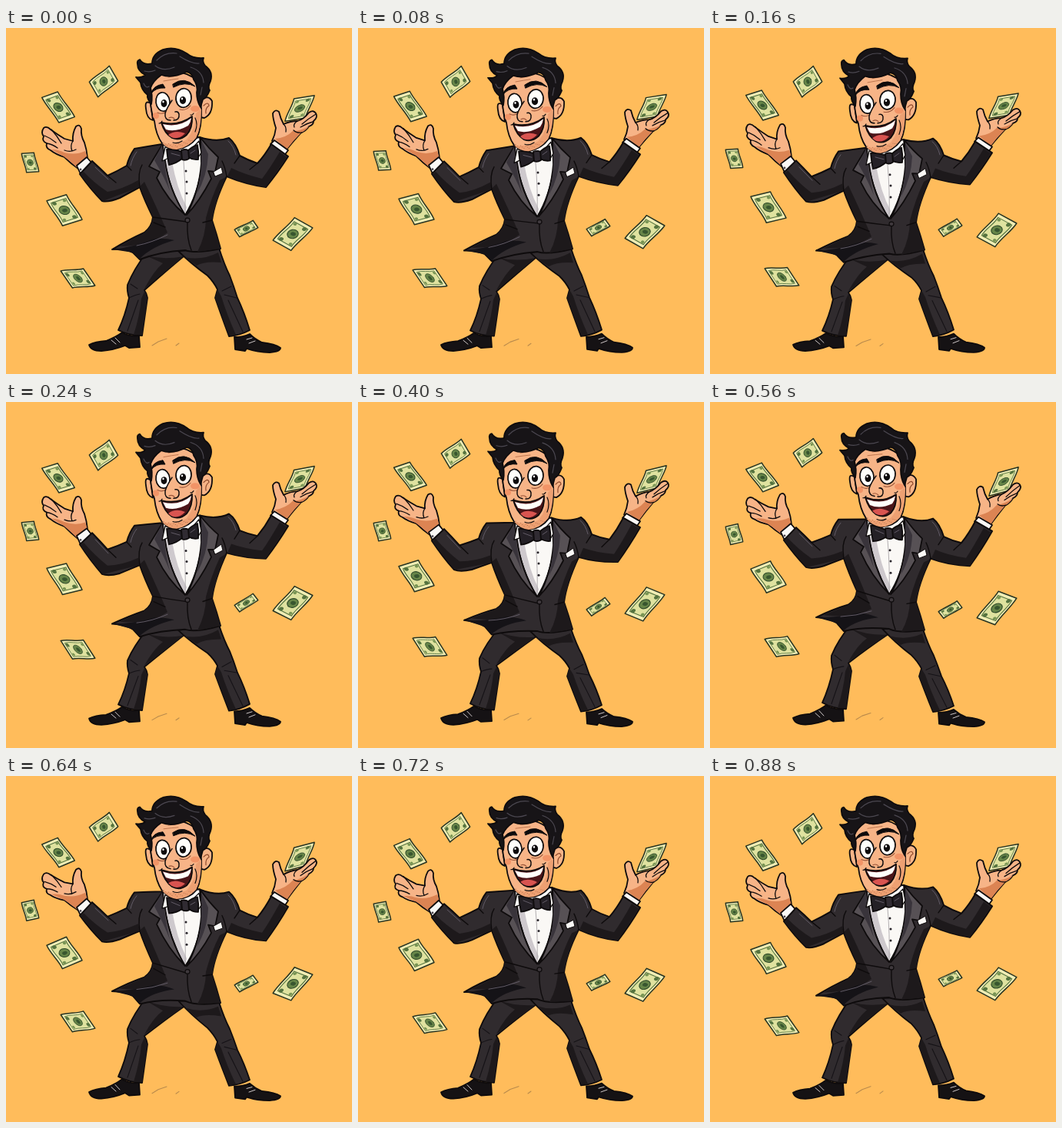
Animation of 450x450 px, one loop 960 ms. Source, as an HTML page with a canvas:

```html
<!DOCTYPE html>
<html lang="en">
<head>
<meta charset="utf-8">
<title>Money juggler</title>
<style>
html, body { margin: 0; width: 100%; height: 100%; overflow: hidden; background: #ffbc5b; }
canvas { display: block; width: 450px; height: 450px; }
</style>
</head>
<body>
<canvas id="stage" width="450" height="450"></canvas>
<script>
const ctx = document.getElementById('stage').getContext('2d');
const LOOP = 960, STEP = 80;
const TOP = 25, BOTTOM = 425, SWELL = 5.6, DELAY = 2.68, LEAD = 239;
const INK = '#0e0b0c', SUIT = '#302b2e', DARK = '#1d191b', LAPEL = '#575155';
const SKIN = '#f7b487', SHADE = '#dc8453', WHITE = '#faf8f5';
let time = 0;

// A vertical ripple runs from left to right, strongest at mid-height.
// Shapes are drawn in their pose at time 0, so the ripple is measured from there.
function sway(x, y) {
  const height = Math.max(0, Math.sin(Math.PI * (y - TOP) / (BOTTOM - TOP)));
  const ripple = t => Math.cos(2 * Math.PI * (t - DELAY * x + LEAD) / LOOP);
  return y + SWELL * height * (ripple(time) - ripple(0));
}

function shape(d, fill, stroke = INK, width = 1.8) {
  const path = new Path2D(d.replace(/([\d.]+),([\d.]+)/g, (_, x, y) => `${x},${sway(+x, +y)}`));
  if (fill) { ctx.fillStyle = fill; ctx.fill(path); }
  if (stroke) { ctx.strokeStyle = stroke; ctx.lineWidth = width; ctx.stroke(path); }
}
const line = (d, color = INK, width = 1.3) => shape(d, null, color, width);

function oval(x, y, rx, ry, fill, stroke, width = 1.6, tilt = 0) {
  ctx.beginPath();
  ctx.ellipse(x, sway(x, y), rx, ry, tilt, 0, 7);
  ctx.fillStyle = fill;
  ctx.fill();
  if (stroke) { ctx.strokeStyle = stroke; ctx.lineWidth = width; ctx.stroke(); }
}

// A note spanned by two half-side vectors around its centre.
function bill({ at: [x, y], u: [ux, uy], v: [vx, vy] }) {
  const k = Math.hypot(ux, uy) / 20;
  const tilt = (dx, dy) => (sway(x + dx, y + dy) - sway(x - dx, y - dy)) / 2;
  const trace = (draw, fill, stroke, width) => {
    ctx.save();
    ctx.transform(ux, tilt(ux, uy), vx, tilt(vx, vy), x, sway(x, y));
    ctx.beginPath();
    draw();
    ctx.restore();
    if (fill) { ctx.fillStyle = fill; ctx.fill(); }
    if (stroke) { ctx.strokeStyle = stroke; ctx.lineWidth = width; ctx.stroke(); }
  };
  const sheet = s => () => {
    ctx.moveTo(-s, -s);
    ctx.bezierCurveTo(-s / 3, -s - .16, s / 3, -s + .16, s, -s);
    ctx.lineTo(s, s);
    ctx.bezierCurveTo(s / 3, s + .16, -s / 3, s - .16, -s, s);
    ctx.closePath();
  };
  trace(sheet(1), '#f0edb4', '#263321', 1.5);
  trace(sheet(.76), '#dfe29f', '#55733f', .9 * k + .2);
  for (const sx of [-1, 1]) {
    trace(() => ctx.ellipse(sx * .66, sx * .5, .14, .2, 0, 0, 7), '#55733f');
    trace(() => ctx.ellipse(sx * .64, -sx * .52, .1, .16, 0, 0, 7), '#789453');
  }
  trace(() => ctx.ellipse(0, 0, .32, .48, 0, 0, 7), '#668548', '#314c2b', 1.1 * k);
  trace(() => ctx.ellipse(.02, .02, .13, .24, 0, 0, 7), '#38562f');
}

const bills = [
  { at: [127, 69.5], u: [13, -10.5], v: [5.7, 9.8] },
  { at: [68, 103], u: [11, 16.3], v: [10.3, -3.7] },
  { at: [31.5, 175], u: [3.2, 12.3], v: [8, -.5] },
  { at: [76, 237], u: [10.2, 16.3], v: [12.8, -4] },
  { at: [93.5, 325.5], u: [14.7, -1.5], v: [7.6, 11] },
  { at: [312.5, 261], u: [12, -6], v: [3.3, 4.7] },
  { at: [373, 268], u: [14, -14.8], v: [11.8, 6.6] }
];
const heldBill = { at: [382, 104.5], u: [5.8, -14.6], v: [13.3, -2.2] };

function legs() {
  shape('M184,290 Q166,314 158,334 Q157,342 160,351 Q155,374 146,393 Q160,400 177,400 Q181,372 184,351 Q183,345 180,341 Q207,317 231,297 L240,288 Z', SUIT);
  shape('M224,290 Q240,306 262,322 Q270,330 275,340 L272,351 Q280,374 290,401 Q304,400 317,393 Q310,370 301,351 Q296,335 291,322 Q284,308 277,286 Z', SUIT);
  shape('M182,296 Q205,302 231,297 Q207,317 180,339 Q192,316 204,306 Z', DARK, null);
  shape('M180,343 L184,351 L177,399 L166,399 Q174,374 176,352 Z', DARK, null);
  shape('M232,298 Q255,303 276,292 L280,305 Q258,303 248,309 Z', DARK, null);
  shape('M275,340 L272,351 L290,400 L299,399 Q287,372 280,349 Z', DARK, null);
  line('M160,351 Q168,347 174,346 M162,333 L171,339 M172,354 L158,394 M293,336 L281,342 M300,351 L284,347 M289,354 L308,395', '#151216', 1.1);
  shape('M108,412 Q116,408 130,407 Q143,402 151,396 Q161,402 173,400 L174,415 L160,416 L155,413 Q140,419 124,420 Q110,420 108,412 Z', '#151214');
  shape('M297,402 Q308,402 317,398 Q324,405 333,409 Q350,411 357,416 Q357,421 343,422 Q327,422 313,417 L311,420 L298,418 Z', '#151214');
  line('M137,406 L143,411 M142,403 L148,409', '#cfc8c8', 1);
  line('M313,405 L320,403 M316,410 L324,407', '#cfc8c8', 1);
  line('M190,413 L198,408 M198,408 L209,404 M221,413 L225,410', '#b98a4c', 1.1);
}

function leftHand() {
  shape('M94,183 Q84,176 76,168 Q64,164 58,159 Q51,156 53,150 Q46,147 49,141 Q45,136 49,130 Q53,127 58,132 Q66,138 76,144 L87,147 Q86,137 91,128 Q96,124 98,131 Q97,140 102,149 Q105,158 106,169 Z', SKIN);
  shape('M59,158 Q68,158 76,162 Q90,166 103,160 L106,169 L94,183 Q82,172 75,167 Z', SHADE, null);
  line('M50,140 Q58,143 65,149 M53,150 Q60,151 67,156 M59,132 Q67,141 72,150 M87,147 Q83,153 86,160 M76,159 Q84,162 91,158');
}

function rightHand() {
  shape('M346,147 Q350,139 351,130 Q347,118 347,111 Q350,105 355,109 Q357,118 361,125 Q370,121 379,121 Q387,119 394,110 Q400,106 403,111 Q406,116 400,121 Q400,126 394,128 Q390,134 384,136 Q374,147 365,158 Z', SKIN);
  shape('M350,144 Q364,143 373,134 Q383,134 394,128 Q389,134 384,136 Q373,147 365,158 Z', SHADE, null);
  line('M403,112 Q393,118 385,125 M399,122 Q391,124 383,129 M361,125 Q365,129 364,135 M379,121 Q373,125 375,129 M385,136 Q378,137 374,133');
}

function jacket() {
  shape('M92,179 L105,168 L112,176 L97,190 Z', WHITE);
  shape('M344,151 L349,146 L367,159 L361,167 Z', WHITE);
  oval(97, 184, 1.4, 1.4, '#4a454c');
  shape('M203,151 Q184,154 167,157 Q160,167 157,179 Q145,186 132,192 Q123,183 112,173 L96,190 Q110,210 125,225 Q133,227 148,221 L174,207 Q180,224 191,246 Q190,258 180,266 Q160,275 138,288 Q155,287 165,292 L174,301 Q200,291 233,289 Q247,294 279,287 Q274,268 268,250 Q271,226 287,193 Q311,203 338,207 Q353,189 367,167 L345,151 Q337,165 327,176 Q315,172 304,166 Q299,150 290,143 Q274,149 252,142 Z', SUIT, INK, 2);
  shape('M97,191 Q112,211 126,225 L174,207 L172,198 Q151,210 132,213 Q115,202 101,187 Z', DARK, null);
  shape('M288,193 Q312,203 338,207 L365,168 L356,161 Q343,183 333,196 Q309,190 293,182 Z', DARK, null);
  shape('M174,206 L191,246 Q190,259 179,267 L148,284 Q188,283 210,266 Q197,235 180,200 Z', DARK, null);
  shape('M279,287 L268,250 Q272,225 286,194 L278,198 Q267,220 260,247 Q260,270 249,291 Z', DARK, null);
  shape('M139,288 Q166,285 193,274 Q207,273 219,276 Q190,284 174,300 L165,292 Z', '#151317', null);
  line('M174,207 Q171,188 177,178 M132,192 L143,201 M157,179 L163,185 M287,193 Q285,181 281,173 M304,166 L297,176 M327,176 L317,184 M192,253 L207,259 M191,246 Q213,249 235,252 M236,253 Q235,274 241,289 M268,250 L256,253', INK, 1.4);
  line('M170,161 Q164,169 162,179 M289,147 Q296,153 299,165 M116,181 L133,197 M210,269 Q190,279 170,283', '#625b66', 1);
}

function shirt() {
  shape('M204,151 Q207,197 233,243 Q249,218 255,179 L252,142 Z', WHITE);
  shape('M207,171 Q213,209 233,242 L235,233 Q222,208 216,174 Z', '#cec9cd', null);
  line('M231,173 Q234,207 233,239', '#aaa5a9', .9);
  for (const [x, y] of [[234, 186], [235, 200], [235, 215]]) oval(x, y, 1.5, 1.5, '#272329');
  shape('M203,152 L186,180 L200,187 L196,195 Q210,224 233,243 Q212,211 207,173 Z', LAPEL);
  shape('M253,143 Q264,157 276,168 L272,187 L263,186 L267,196 Q252,225 235,243 Q251,213 254,176 Z', LAPEL);
  shape('M203,152 L193,172 Q207,196 213,212 Q207,189 206,173 Z', '#39343b', null);
  shape('M254,146 L263,164 Q262,192 248,216 Q254,195 254,174 Z', '#39343b', null);
  shape('M270,187 L280,181 L282,189 L272,193 Z', WHITE, INK, 1);
  shape('M207,155 L203,173 L214,168 L229,163 Z M251,147 L254,162 L249,170 L236,163 Z', WHITE, INK, 1.3);
  shape('M229,161 Q218,157 209,158 Q210,169 212,178 Q222,176 230,169 Z', '#242026');
  shape('M236,160 Q242,154 249,152 Q251,161 250,171 Q243,172 237,168 Z', '#242026');
  shape('M228,159 Q233,157 237,159 L238,170 Q233,173 229,171 Z', '#302b32');
  line('M215,163 L226,166 M240,163 L246,159', '#625b66', 1);
  oval(236, 250, 3, 2.8, '#3f393d', INK, 1.2);
}

function face() {
  shape('M188,98 Q180,93 182,105 Q183,118 191,120 Z', SKIN);
  shape('M253,94 Q263,86 268,95 Q269,112 258,117 L252,116 Z', SKIN);
  line('M257,101 Q263,95 264,101 Q259,104 260,111', '#8f4b2d', 1.2);
  shape('M187,76 Q187,106 193,121 Q195,139 203,150 Q213,159 223,158 Q239,155 248,143 Q255,129 254,105 L251,70 Q228,49 195,62 Z', SKIN);
  shape('M254,105 Q254,130 247,143 Q236,156 222,158 Q211,158 203,150 Q222,153 235,145 Q247,131 247,111 Z', '#eda072', null);
  oval(246, 105, 6, 4, '#f29467');
  oval(195, 114, 4, 4, '#f29467');
  for (let i = 0; i < 18; i++) {
    oval(205 + i * 2.2, 149 + 4.5 * Math.sin(i * .19) + i % 3 * 1.5 - i * .28, .5, .5, '#a76545');
  }

  oval(204, 96, 9, 12.3, '#fffefa', INK, 1.7, -.12);
  oval(231, 91, 10, 12.3, '#fffefa', INK, 1.7, .1);
  oval(205.5, 98, 3.9, 4.9, INK);
  oval(230, 94, 4.1, 5, INK);
  oval(204.5, 96, 1.2, 1.4, '#fff');
  oval(229, 92, 1.2, 1.4, '#fff');
  line('M197,110 Q203,113 208,109 M226,106 Q234,108 240,101', '#9b563a', 1.1);
  shape('M189,85 Q191,75 204,73 L207,78 Q195,77 189,85 Z', INK, INK, 1);
  shape('M217,73 Q232,62 246,76 Q233,69 218,77 Z', INK, INK, 1);
  line('M205,69 Q216,67 224,66 M211,64 L222,62', '#be764f', 1);

  shape('M216,93 Q210,104 207,111 Q207,120 214,120 Q224,121 226,114 Q225,108 221,103 L220,94 Z', SKIN, null);
  line('M216,94 Q209,104 207,111 Q206,120 214,120 M218,120 Q226,120 225,112 Q224,108 220,109', INK, 1.5);
  line('M212,117 Q216,115 219,118', '#9b563a', 1.2);

  shape('M202,123 Q224,128 242,115 Q243,130 235,139 Q226,147 216,143 Q206,137 202,123 Z', '#4b1519', INK, 1.8);
  shape('M204,125 Q225,130 241,117 Q240,123 237,127 Q221,136 208,132 Z', '#fffefa', null);
  shape('M211,139 Q220,132 233,137 Q224,146 215,142 Z', '#d95450', null);
  line('M199,124 Q202,124 203,121 M240,113 Q242,114 244,111 M217,149 Q223,151 229,147 M246,117 Q250,125 246,135', INK, 1.2);
}

function hair() {
  shape('M189,99 Q183,92 184,87 Q176,81 175,71 L169,64 Q177,65 181,61 Q171,56 171,47 Q170,42 174,41 Q179,49 190,46 Q190,34 204,28 Q220,23 235,33 Q243,40 257,39 Q255,44 259,49 Q270,57 266,69 Q262,77 265,81 Q261,91 256,93 L253,103 Q248,95 248,84 Q250,75 244,67 Q242,58 235,57 Q216,66 202,61 Q191,69 188,78 Q191,88 189,99 Z', '#171417', INK, 1.8);
  line('M194,49 Q204,57 219,51 M196,42 Q207,31 222,33 M226,37 Q242,47 251,46 M240,51 Q256,56 257,71 M180,56 Q187,58 194,55 M179,72 Q182,79 186,76 M255,77 L253,87', '#4b4750', 1.2);
}

function draw(now) {
  time = Math.floor(now % LOOP / STEP) * STEP;
  ctx.lineJoin = ctx.lineCap = 'round';
  ctx.fillStyle = '#ffbc5b';
  ctx.fillRect(0, 0, 450, 450);
  bills.forEach(bill);
  legs();
  leftHand();
  bill(heldBill);
  rightHand();
  jacket();
  shirt();
  face();
  hair();
}

let start;
function tick(now) {
  start ??= now;
  draw(now - start);
  requestAnimationFrame(tick);
}
draw(0);
requestAnimationFrame(tick);
</script>
</body>
</html>
```
